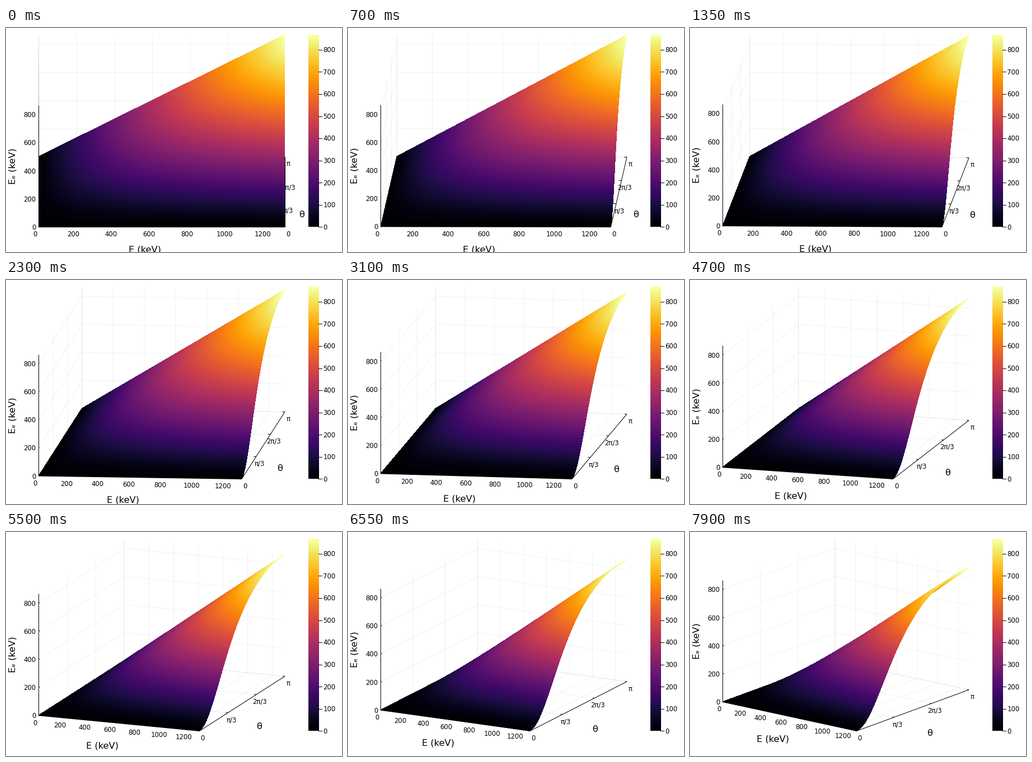
These frames come from a looping animation (600x400 px, 8 s). A matplotlib script:

```python
import numpy as np
import matplotlib.pyplot as plt
from matplotlib.animation import FuncAnimation
from matplotlib.collections import LineCollection, PolyCollection

W, H = 600, 400
LEFT, RIGHT, TOP, BOTTOM = 58.4, 498, 12.5, 355.4
E_MAX = 1300
Z_MAX = E_MAX * 2 / 3
TILT = np.radians(30)
FLOOR = np.sin(TILT) / (np.sin(TILT) + np.cos(TILT))
N_E, N_T = 90, 120
TICK = 0.012
LIFT = 0.6  # the sheet floats slightly above the axis lines
STEP_MS = 50
LOOP_MS = 8000

E_TICKS = np.arange(0, E_MAX, 200)
Z_TICKS = np.arange(0, Z_MAX, 200)
BAR_TICKS = np.arange(0, Z_MAX, 100)
T_LABELS = ["0", "π/3", "2π/3", "π"]
U, V, S = E_TICKS / E_MAX, np.arange(4) / 3, Z_TICKS / Z_MAX

plt.rcParams["font.family"] = "DejaVu Sans"
PX = 0.72
SMALL, LARGE = 8.4, 11.7


def project(u, v, w, az):
    """Unit-cube coordinates to stage pixels for an azimuth in degrees."""
    c, s = np.cos(np.radians(az)), np.sin(np.radians(az))
    x = LEFT + (RIGHT - LEFT) * (u * c + v * s) / (c + s)
    up = FLOOR * (v * c * c + (1 - u) * s * s) + (1 - FLOOR) * w
    return np.stack(np.broadcast_arrays(x, BOTTOM - (BOTTOM - TOP) * up), -1)


def electron_energy(u, v):
    k = 1 - np.cos(np.pi * v)
    return 1.5 * u * k / (1 + k)


def build_cells():
    """Cells from back to front, each reaching under the next ones to hide seams."""
    j, i = np.meshgrid(np.arange(N_T)[::-1], np.arange(N_E), indexing="ij")
    i, j = i.ravel(), j.ravel()
    u0, u1 = i / N_E, np.minimum(i + 2, N_E) / N_E
    v0, v1 = np.maximum(j - 1, 0) / N_T, (j + 1) / N_T
    u = np.stack([u0, u1, u1, u0], 1)
    v = np.stack([v0, v0, v1, v1], 1)
    shade = electron_energy((i + 0.5) / N_E, (j + 0.5) / N_T)
    return u, v, electron_energy(u, v), shade


def grid_paths():
    paths = [[(u, 0, 0), (u, 1, 0), (u, 1, 1)] for u in U]
    paths += [[(1, v, 0), (0, v, 0), (0, v, 1)] for v in V]
    paths += [[(0, 0, s), (0, 1, s), (1, 1, s)] for s in S]
    return np.array(paths, float)


def axis_paths():
    paths = [[(0, 0, 0), (1, 0, 0)], [(1, 0, 0), (1, 1, 0)], [(0, 0, 0), (0, 0, 1)]]
    paths += [[(u, 0, 0), (u, TICK, 0)] for u in U]
    paths += [[(1, v, 0), (1 - TICK, v, 0)] for v in V]
    paths += [[(0, 0, s), (0, TICK, s)] for s in S]
    return np.array(paths, float)


fig = plt.figure(figsize=(W / 100, H / 100), dpi=100, facecolor="white")
ax = fig.add_axes([0, 0, 1, 1])
ax.set_axis_off()

# Colour bar
ax.imshow(np.linspace(1, 0, 256)[:, None], cmap="inferno", aspect="auto",
          extent=(540, 558.5, BOTTOM, TOP))
for z in BAR_TICKS:
    y = BOTTOM - (BOTTOM - TOP) * z / Z_MAX
    ax.plot([558, 563.5], [y, y], color="black", lw=PX)
    ax.text(566.3, y + 4.3, f"{z:.0f}", fontsize=SMALL)
ax.set_xlim(0, W)
ax.set_ylim(H, 0)

GRID, AXES = grid_paths(), axis_paths()
CELL_U, CELL_V, CELL_W, shade = build_cells()

grid = LineCollection([], colors=[(0, 0, 0, 0.1)], linewidths=0.5 * PX, zorder=1)
axes = LineCollection([], colors="black", linewidths=PX, zorder=2)
surface = PolyCollection([], facecolors=plt.get_cmap("inferno")(shade),
                         edgecolors="none", linewidths=0, antialiaseds=False, zorder=4)
for item in (grid, axes, surface):
    ax.add_collection(item, autolim=False)

labels = []


def add_label(text, anchor, dx, dy, size=SMALL, **style):
    style = {"ha": "center", "va": "baseline", "zorder": 3, **style}
    labels.append((ax.text(0, 0, text, fontsize=size, **style), anchor, dx, dy))


for e, u in zip(E_TICKS, U):
    add_label(f"{e:.0f}", (u, 0, 0), -6, 16.8)
for name, v in zip(T_LABELS, V):
    add_label(name, (1, v, 0), 6, 16.4)
for z, s in zip(Z_TICKS, S):
    add_label(f"{z:.0f}", (0, 0, s), -4.7, 4.6, ha="right")
add_label("E (keV)", (0.5, 0, 0), -30.3, 45, LARGE)
add_label("θ", (1, 0.5, 0), 30, 45.5, LARGE)
add_label("Eₑ (keV)", (0, 0, 0.5), -41.6, 0, LARGE, rotation=90, rotation_mode="anchor")


def azimuth(t):
    """One degree per step, with steps held 150 and 250 ms in turn."""
    return (t + 250) // 400 + (t + 100) // 400


def update(frame):
    az = azimuth(frame * STEP_MS)
    grid.set_segments(project(*np.moveaxis(GRID, -1, 0), az))
    axes.set_segments(project(*np.moveaxis(AXES, -1, 0), az))
    surface.set_verts(project(CELL_U, CELL_V, CELL_W, az) - (0, LIFT))
    for text, anchor, dx, dy in labels:
        x, y = project(*anchor, az)
        text.set_position((x + dx, y + dy))
    return []


anim = FuncAnimation(fig, update, frames=LOOP_MS // STEP_MS, interval=STEP_MS,
                     init_func=lambda: update(0), repeat=True, repeat_delay=0)
plt.show()
```
